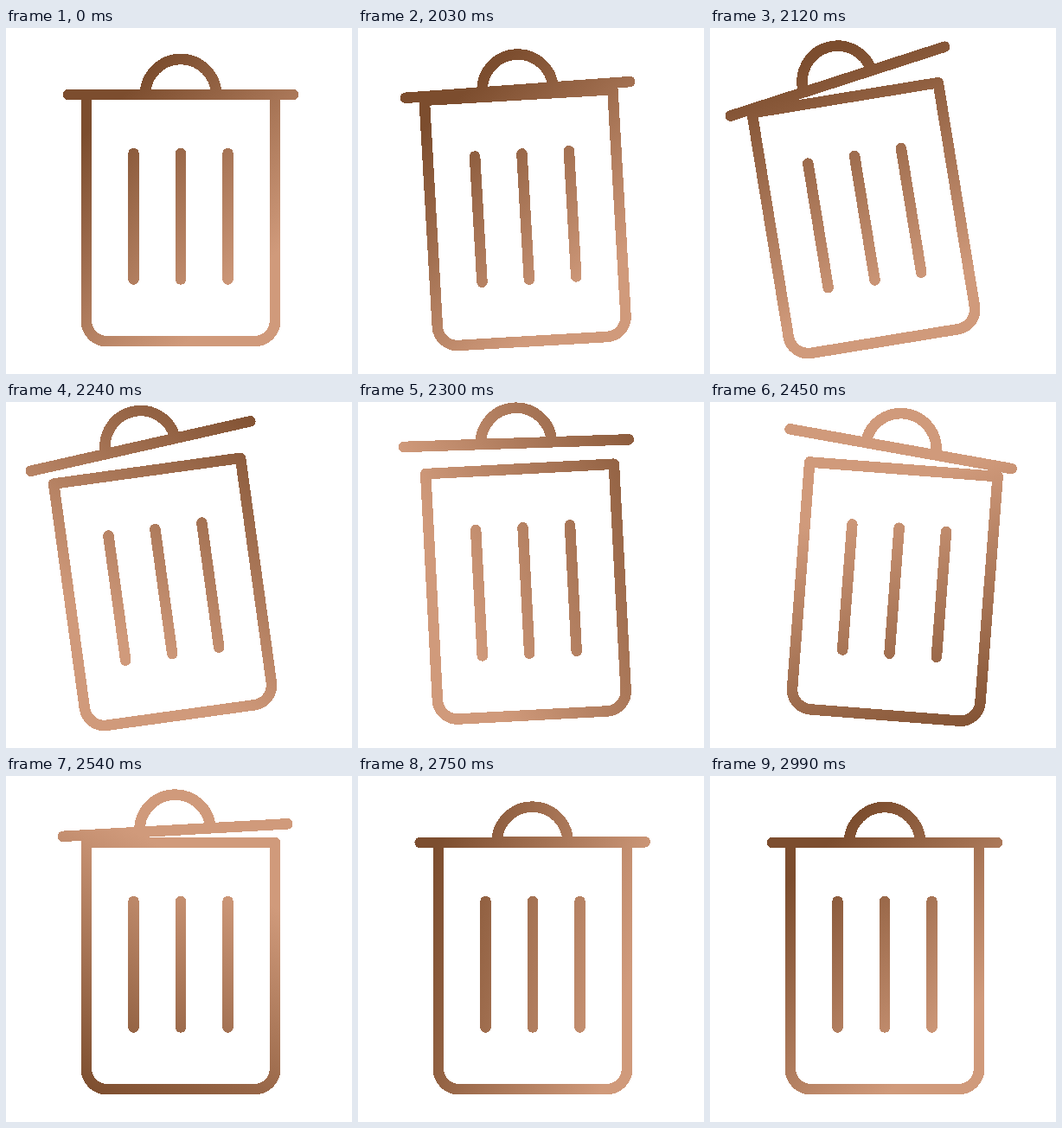
Recreate the animation shown at these times as an HTML page. Size 400x400 px, loop 3.02 s.

```html
<!DOCTYPE html>
<html lang="en">
<head>
<meta charset="utf-8">
<title>Trash bin</title>
<style>
  html, body { margin: 0; width: 100%; height: 100%; overflow: hidden; background: #fff; }
  svg { display: block; width: 100%; height: 100%; }
</style>
</head>
<body>
<svg viewBox="0 0 400 400">
  <defs>
    <linearGradient id="copper" gradientUnits="userSpaceOnUse" y1="0" y2="0">
      <stop offset="0" stop-color="#7c4d2e"/>
      <stop offset="1" stop-color="#d09a7b"/>
    </linearGradient>
    <mask id="bin" maskUnits="userSpaceOnUse" x="0" y="0" width="400" height="400">
      <g id="body" fill="none" stroke="#fff" stroke-width="12.5" stroke-linejoin="round" shape-rendering="crispEdges">
        <path d="M93 77H311V339a23 23 0 0 1-23 23H116a23 23 0 0 1-23-23Z"/>
        <path d="M147.5 145V290.5M202 145V290.5M256.5 145V290.5" stroke-linecap="round"/>
        <g id="lid">
          <path d="M-130 0H130" stroke-linecap="round"/>
          <path d="M-41 0a41 41 0 0 1 82 0"/>
        </g>
      </g>
    </mask>
  </defs>
  <rect width="400" height="400" fill="url(#copper)" mask="url(#bin)"/>
</svg>
<script>
const LOOP = 3020, HOLD = 2030, STEP = 30;
const SPIN = 990, OPEN = 660, CLOSED = 790;

const easeOut = u => 1 - (1 - u) ** 2;
const easeInOut = u => u < 0.5 ? 2 * u * u : 1 - 2 * (1 - u) ** 2;

// Moves from 0 through [ms, value] poses; the first move may ease differently.
function track(firstEase, ...poses) {
  return t => {
    let from = 0, since = 0, ease = firstEase;
    for (const [until, value] of poses) {
      if (t < until) return from + (value - from) * ease((t - since) / (until - since));
      [from, since, ease] = [value, until, easeInOut];
    }
    return from;
  };
}

const bodyTurn = track(easeOut, [165, -10], [440, 4.5], [540, 0]);
const lidTurn = track(easeInOut, [140, -9], [420, 7], [540, -3.2], [CLOSED, 0]);
const lidLift = track(easeOut, [280, 30], [CLOSED, 0]);
const lidShift = track(easeInOut, [130, -5.5], [320, -2.5], [540, -6.5], [CLOSED, 0]);

const copper = document.getElementById('copper');
const body = document.getElementById('body');
const lid = document.getElementById('lid');

// The shading makes one turn, stretching while the lid is up.
function shade(t) {
  const u = t / SPIN;
  const turn = 0.25 * u + 0.75 * (1 - (1 - u * u) ** 4);
  const stretch = Math.sin(Math.PI * Math.min(t / OPEN, 1));
  const middle = 12 + 62 * stretch;
  const half = 127 + 36 * stretch;
  copper.setAttribute('x1', middle + half);
  copper.setAttribute('x2', middle - half);
  copper.setAttribute('gradientTransform', `translate(202 208) rotate(${360 * turn - 135})`);
}

function draw(time) {
  const t = time < HOLD ? 0 : (Math.floor((time - HOLD) / STEP) + 1) * STEP;
  body.setAttribute('transform', `rotate(${bodyTurn(t)} 202 362)`);
  lid.setAttribute('transform',
    `translate(${202 + lidShift(t)} ${77 - lidLift(t)}) rotate(${lidTurn(t)})`);
  shade(t);
}

const start = performance.now();
function tick() {
  draw((performance.now() - start) % LOOP);
  requestAnimationFrame(tick);
}
tick();
</script>
</body>
</html>
```
